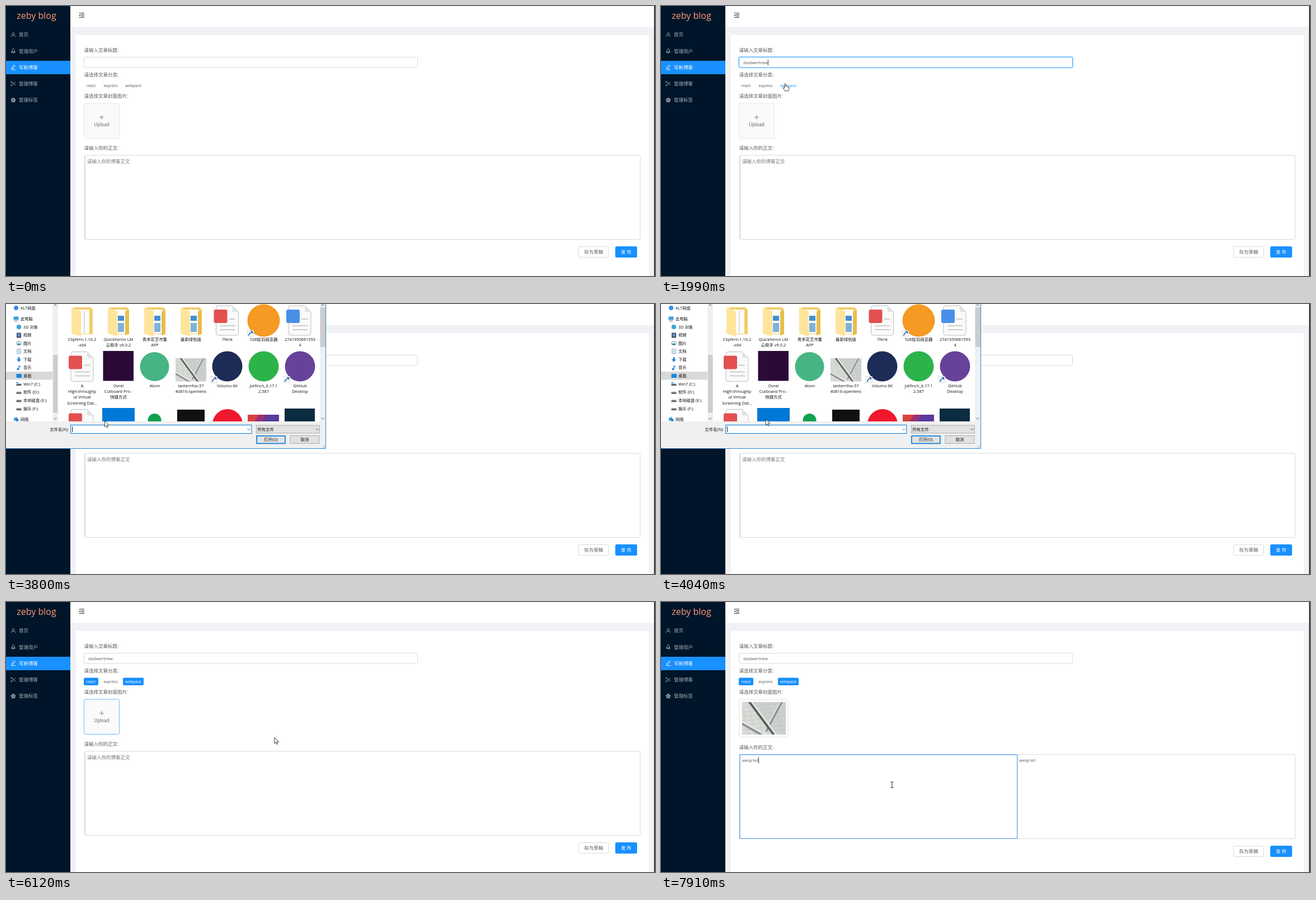
An HTML page that plays this animation: 1160 by 483 pixels, repeating every 7990 ms.

```html
<!DOCTYPE html>
<html>
<head>
<meta charset="utf-8">
<title>Blog editor</title>
<style>
  html, body { margin: 0; width: 100%; height: 100%; overflow: hidden; background: #fff; }
  svg { display: block; }
  text { font-family: 'Open Sans', 'Noto Sans CJK SC', 'Noto Sans CJK JP', sans-serif; white-space: pre; }
</style>
</head>
<body>
<svg id="stage" width="1160" height="483" viewBox="0 0 1160 483"></svg>
<script>
const LOOP = 7990;
const BLUE = '#1890ff', INK = '#595959', LINE = '#d9d9d9', WIN = '#0078d7';

// y is the middle of the line of text
const text = (x, y, str, size = 8.5, fill = INK, more = '') =>
  `<text x="${x}" y="${y + size * 0.36}" font-size="${size}" fill="${fill}" ${more}>${str}</text>`;
const rect = (x, y, w, h, fill, more = '') =>
  `<rect x="${x}" y="${y}" width="${w}" height="${h}" fill="${fill}" ${more}/>`;
const circle = (x, y, r, fill, more = '') =>
  `<circle cx="${x}" cy="${y}" r="${r}" fill="${fill}" ${more}/>`;
const path = (d, fill, more = '') => `<path d="${d}" fill="${fill}" ${more}/>`;
const line = (d, stroke, width = 1) =>
  path(d, 'none', `stroke="${stroke}" stroke-width="${width}"`);
const group = (id, body, more = '') => `<g id="${id}" ${more}>${body}</g>`;
const box = (x, y, w, h, stroke, fill = '#fff', more = '') =>
  rect(x, y, w, h, fill, `stroke="${stroke}" rx="2.5" ${more}`);
const MID = 'text-anchor="middle"';

const photo = `<symbol id="photo" viewBox="0 0 78 58" preserveAspectRatio="none">
  ${rect(0, 0, 78, 58, '#cdd0cd')}
  ${path('M0 0H14L58 58H0Z', '#d9dbd7')}
  ${[...Array(9)].map((_, i) =>
    line(`M${i * 12 - 14} 0l14 58M0 ${i * 8 + 2}l78 -9`, '#b4b8b5', 0.5)).join('')}
  ${line('M70 0L42 52', '#8b918e', 5)}${line('M68 0L40 52', '#e3e5e2', 2)}
  ${line('M13 -2L59 60', '#59605e', 6)}${line('M16 -2L62 60', '#e6e8e5', 3)}
  ${line('M0 38L38 60', '#8d9390', 5)}${line('M0 35L42 59', '#e9ebe8', 2.5)}
</symbol>`;

function sidebar() {
  const icons = [
    'M-3.5 4a3.5 3.5 0 0 1 7 0M0 .5a2 2 0 1 1 .1 0',
    'M-2 2V-1Q-2 -3 0 -4.5Q2 -3 2 -1V2ZM-2 0L-3.5 2.5H3.5L2 0M0 2.5V4.5',
    'M-3 2L-2.5 0L2 -4L3.5 -2.5L-1 1.8ZM-4 4H4',
    'M-3 -3L4 3M-3 3L4 -3M-3.4 -2a1 1 0 1 1 .1 0M-3.4 4a1 1 0 1 1 .1 0',
    'M0 -4L4 -1L2.5 3.5H-2.5L-4 -1ZM-4 -1H4L-2.5 3.5L0 -4L2.5 3.5Z'
  ];
  const names = ['首页', '管理用户', '写新博客', '管理博客', '管理标签'];
  return rect(0, 0, 115, 483, '#001529') +
    text(54.5, 17.5, 'zeby blog', 16, '#ff9b7b', MID) +
    rect(0, 98, 115, 24, BLUE) +
    names.map((name, i) => {
      const y = 51.2 + i * 29.25, on = i === 2, color = on ? '#fff' : '#a6adb4';
      return `<g transform="translate(13 ${y})">${line(icons[i], color, 0.9)}</g>` +
        text(23, y, name, 8.5, color, on ? 'font-weight="500"' : '');
    }).join('');
}

function page() {
  const tags = [['react', 139, 26], ['express', 170, 34], ['webpack', 209, 37]];
  return rect(0, 0, 1160, 483, '#f0f2f5') + rect(115, 0, 1043, 37.5, '#fff') +
    rect(125, 52, 1024, 431, '#fff') + rect(1158.5, 0, 1.5, 483, '#111') +
    line('M130.5 12.8H140M134 15.4H140M134 18H140M130.5 20.6H140', '#333') +
    path('M130.5 16.7l2.4 -1.8v3.6z', '#333') +
    text(139.5, 78.5, '请输入文章标题:') +
    box(138.5, 90.5, 598, 20, '#1890ff', 'none', 'id="glow" stroke-width="2" stroke-opacity=".25"') +
    box(139.5, 91.5, 596, 18.5, LINE, '#fff', 'id="input"') +
    text(147, 101, '', 7.85, INK, 'id="title"') +
    rect(0, 96, 0.8, 10, '#000', 'id="titleCaret"') +
    text(139.5, 123, '请选择文章分类:') +
    tags.map(([name, x, w]) =>
      rect(x, 135.5, w, 13.5, BLUE, `id="${name}Bg" rx="2"`) +
      text(x + w / 2, 142.3, name, 7, INK, `id="${name}" ${MID}`)).join('') +
    text(139.5, 161, '请选择文章封面图片:') +
    box(139.5, 174, 63, 62.5, LINE, '#fafafa', 'id="card" stroke-dasharray="2 1.2"') +
    group('uploadHint', line('M171 195V203M167 199H175', '#777', 0.9) +
      text(171, 212, 'Upload', 8.2, INK, MID)) +
    '<use id="cover" href="#photo" x="145" y="179" width="78" height="58"/>' +
    group('lower',
      text(139.5, 254, '请输入你的正文:') +
      box(140.5, 267, 993, 150.5, LINE) + line('M141.5 268V417', '#d0d0d0', 0.8) +
      rect(140.7, 267.3, 496, 149.8, 'none', 'id="ring" stroke="#6ea3f8" stroke-width="1.4" rx="1"') +
      text(145, 277.5, '请输入你的博客正文', 8.5, '#757575', 'id="placeholder"') +
      text(145, 277.5, '', 8, INK, 'id="body"') +
      text(640, 277.5, '', 8, INK, 'id="preview"') +
      rect(0, 271.5, 0.8, 11, '#000', 'id="bodyCaret"') +
      box(1023.5, 430.5, 53.5, 19, LINE) + text(1050.3, 440, '存为草稿', 8.5, INK, MID) +
      rect(1089, 430, 39, 20, BLUE, 'rx="2.5"') + text(1108.5, 440, '发 布', 8.5, '#fff', MID));
}

const folder = (x, strip) =>
  path(`M${x - 15} 6H${x + 15}L${x + 19} 10V54H${x - 12}Z`, '#f2cd68') +
  rect(x - 9, 10, 22, 43, '#fbfbf8') +
  (strip ? rect(x - 1, 21, 11, 9, '#3f8fd8') + rect(x - 1, 34, 11, 16, '#7eb2dc') +
    path(`M${x + 12} 14l7 -3v43l-7 2z`, '#e9bd4d') : line(`M${x + 4} 12v40`, '#ddd', 2)) +
  path(`M${x - 19} 6l17 7v45l-17 -5z`, '#ffe49c');

const doc = (x, y, color) =>
  path(`M${x - 20} ${y + 4}q0 -4 4 -4h25l11 11v38q0 4 -4 4h-32q-4 0 -4 -4z`, '#fafafa', 'stroke="#bdbdbd"') +
  path(`M${x + 9} ${y}v8q0 3 3 3h8z`, '#e2e2e2') +
  line(`M${x + 3} ${y + 24}h11M${x - 13} ${y + 36}h27M${x - 13} ${y + 43}h27`, '#ccc', 2) +
  rect(x - 24, y + 7, 24, 24, color, 'rx="3"');

const shortcut = (x, y) =>
  rect(x - 5.5, y - 5.5, 11, 11, '#fff', 'stroke="#bbb" stroke-width=".6"') +
  line(`M${x - 3} ${y + 4}q0 -4 4 -5`, '#1c62b5', 1.8) +
  path(`M${x - 1} ${y - 4}h5v5z`, '#1c62b5');

const chevron = (x, y, s = 1) => line(`M${x - 2.5} ${y - 1.2 * s}l2.5 ${2.4 * s}l2.5 ${-2.4 * s}`, '#444', 0.9);

function navPane() {
  const drive = [143, 157.6, 172.2, 187];
  const rows = [['KLT网盘', 7], ['此电脑', 26.5], ['3D 对象', 41], ['视频', 55.8], ['图片', 70.3],
    ['文档', 84.8], ['下载', 99.3], ['音乐', 113.8], ['桌面', 128.4], ['Win7 (C:)', 143],
    ['软件 (D:)', 157.6], ['本地磁盘 (E:)', 172.2], ['娱乐 (F:)', 187], ['网络', 206]];
  const top = [0, 1, 13];
  return rect(0, 121, 83, 14.5, LINE) +
    rows.map(([name, y], i) => text(top.includes(i) ? 26 : 31, y, name, 7.3, '#111')).join('') +
    circle(18, 7, 4, '#3c8be8') +
    rect(13.5, 22.5, 9, 6, '#3b9fe0') + line('M15 30.5h6', '#667') +
    path('M23 36.5l4 2v5l-4 2l-4 -2v-5z', '#3aa7dc') +
    rect(19, 51.5, 8, 9, '#44546a') + rect(21, 53, 4, 5, '#6f8fe0') +
    box(19, 67, 8, 6.5, '#6d9fc5', '#d8eefb') + path('M19.5 73l3 -3l2 1l2 2z', '#3a8a5c') +
    rect(19.8, 80.5, 6.5, 8.5, '#fff', 'stroke="#7b93a8" stroke-width=".8"') +
    line('M21 83h4M21 85h4M21 87h4', '#4b8fd0', 0.7) +
    path('M21.5 95h3v4h2.5l-4 5l-4 -5h2.5z', '#2b83d8') +
    line('M23 110v6M23 110q1 2 3 3', '#2b83d8', 1.3) + circle(21.5, 116.5, 2, '#2b83d8') +
    rect(18.5, 125, 9.5, 7, '#1787e0') +
    drive.map((y) => rect(18.5, y, 9, 3.2, '#5d6670') + line(`M19.5 ${y - 0.8}h7`, '#c2c8cc', 1.2)).join('') +
    rect(18.5, 139.5, 3, 2.5, '#25a5e8') +
    path('M14 204l6 -2v6l-6 1z', '#3b9fe0') + circle(20, 207.5, 2.5, '#2d78c4') +
    rect(83.5, 0, 9.5, 210, '#f0f0f0') + rect(84, 91, 8.5, 103.5, '#cdcdcd') +
    chevron(88, 2, -1) + chevron(88, 205);
}

function files() {
  const cols = [136, 201, 266, 330.5, 395.5, 460.5, 525.5];
  const names = [
    ['Clipfern-1.16.2|-x64', 'Quickheron LM|云助手 v9.0.2', '青禾花艺市集|APP', '最新绿色版', '7fenk',
      '528轻羽阅览器', '2741950681593|4'],
    ['A|High-throughp|ut Virtual|Screening Dat...', 'Ovrel|Cutboard Pro -|快捷方式', 'Atom',
      'lanternfox-57|40816-openlens', 'Volumo 6K', 'Jotfinch_6.17.1|2.587', 'GitHub|Desktop']
  ];
  const labels = names.map((row, r) => row.map((name, c) => name.split('|').map((part, i) =>
    text(cols[c], 63.5 + r * 82.5 + i * 10.3, part, 7.4, '#111', MID)).join('')).join('')).join('');
  return rect(299.5, 82, 63, 81, '#cce8ff', 'id="picked" stroke="#99d1ff"') +
    folder(136) + folder(201, 1) + folder(266, 1) + folder(331, 1) +
    doc(395.5, 3, '#e2504f') + circle(460.5, 29.5, 29, '#f59a23') + doc(525, 3, '#4a8fe7') +
    doc(136, 85.5, '#e2504f') + rect(173.5, 84, 54.5, 53.5, '#2b0a38') +
    circle(265.5, 112, 26, '#46b583') +
    '<use href="#photo" x="303" y="97" width="55" height="41.5"/>' +
    circle(395.5, 111.5, 27, '#1d2b57') + circle(460.5, 111.5, 27, '#2cb34a') + circle(525.5, 111.5, 27, '#66429a') +
    doc(136, 188.5, '#e2504f') + rect(172, 186, 58, 30, WIN) + circle(265.5, 208, 12, '#12a150') +
    rect(306, 189, 49, 30, '#111') + circle(396, 215, 27, '#f0182d') +
    rect(432, 198, 56, 20, '#9c2f74') + path('M432 198h20l-8 12h-12z', '#d8423f') + path('M466 198h22v12h-30z', '#5a3a9c') +
    rect(498, 187, 54, 30, '#0b2b40') +
    shortcut(437, 52.5) + shortcut(372, 135) + shortcut(502, 135) +
    group('lateMarks', shortcut(177, 135) + shortcut(242, 135)) + labels;
}

function dialog() {
  return rect(0, 0, 572, 259, '#f0f0f0') +
    `<g clip-path="url(#pane)">${rect(0, 0, 572, 210, '#fff')}${navPane()}${files()}` +
    rect(561, 0, 10.5, 210, '#f0f0f0') + rect(561.5, 6, 9.5, 71, '#cdcdcd') +
    chevron(566, 2, -1) + chevron(566, 205) + '</g>' +
    text(112, 224, '文件名(N):', 7.3, '#111', 'text-anchor="end"') +
    rect(115.5, 216.5, 323.5, 15, '#fff', `stroke="${WIN}"`) + chevron(434, 224.3) +
    text(117.5, 224, 'lanternfox-5740816-openlens', 7.4, '#111', 'id="fileName"') +
    rect(118, 219, 0.9, 10, '#000', 'id="fileCaret"') +
    rect(447.5, 217, 113, 14, '#e1e1e1', 'stroke="#adadad"') + text(449.5, 224, '所有文件', 7.3, '#111') + chevron(556, 224.3) +
    rect(448, 236, 51, 13.5, '#e1e1e1', `stroke="${WIN}" stroke-width="1.6"`) + text(473.5, 242.6, '打开(O)', 7.3, '#111', MID) +
    rect(508, 235.5, 52, 14, '#e1e1e1', 'stroke="#adadad"') + text(534, 242.6, '取消', 7.3, '#111', MID) +
    line('M565 257.5l5 -5M567.5 257.5l2.5 -2.5', '#aaa', 1) +
    line('M0 258.5H571.5V0', '#2b84cf', 1);
}

const pointers =
  path('M0 0V11L2.5 8.7L4.1 12.4L5.8 11.6L4.2 8H7.4Z', '#fff', 'id="arrow" stroke="#111" stroke-width=".8"') +
  path('M-1.2 .8Q0 -.8 1.2 .8V5Q2.4 4.2 3.2 5.4Q4.4 4.7 5.2 6Q6.9 5.6 7 7.4Q7 10.5 5.5 13H-.5Q-1.5 10.5 -4 8Q-4 6 -1.2 7.6Z',
    '#fff', 'id="hand" stroke="#111" stroke-width=".8"') +
  group('beam', line('M-2.5 -5H2.5M0 -5V5M-2.5 5H2.5', '#222', 1));

const stage = document.getElementById('stage');
stage.innerHTML = `<defs>${photo}<clipPath id="pane"><rect width="572" height="210"/></clipPath></defs>` +
  page() + sidebar() + group('dialog', dialog()) + group('pointer', pointers);

const $ = (id) => document.getElementById(id);
const show = (id, on) => $(id).setAttribute('visibility', on ? 'inherit' : 'hidden');
const set = (id, attrs) => Object.entries(attrs).forEach(([k, v]) => $(id).setAttribute(k, v));
const between = (t, a, b) => t >= a && t < b;
const ramp = (t, a, b) => Math.min(1, Math.max(0, (t - a) / (b - a)));

// pointer runs: [time, x, y]; it hides while keys are pressed
const runs = [
  [920, [[70, 951, 441], [250, 830, 370], [700, 375, 112], [780, 352, 102]]],
  [7280, [[1690, 352, 102], [1990, 222, 139], [2300, 222, 139], [2690, 152, 142], [2920, 152, 142],
    [3300, 174, 200], [3470, 172, 210], [3700, 172, 210], [4040, 187, 206], [4410, 345, 150],
    [4490, 359, 132], [4650, 354, 125], [5300, 354, 125], [5650, 478, 250], [5800, 480, 242],
    [6120, 480, 242], [6590, 413, 304], [6680, 413, 306]]],
  [LOOP, [[7760, 413, 310], [7910, 413, 327]]]
];

function pointerAt(t) {
  const run = runs.find(([end, pts]) => between(t, pts[0][0], end));
  if (!run) return null;
  const pts = run[1], i = pts.findIndex((p) => p[0] > t);
  if (i < 0) return pts[pts.length - 1].slice(1);
  const [a, b] = [pts[i - 1], pts[i]], k = ramp(t, a[0], b[0]);
  return [a[1] + (b[1] - a[1]) * k, a[2] + (b[2] - a[2]) * k];
}

const typed = (word, times, t) => word.slice(0, times.filter((s) => t >= s).length);
const titleKeys = [1000, 1150, 1300, 1610, 1610, 1690, 1690, 1760, 1760, 1840];
const bodyKeys = [7280, 7360, 7360, 7440, 7510, 7590, 7760];

function typeInto(id, caret, word, x, on) {
  $(id).textContent = word;
  show(caret, on);
  $(caret).setAttribute('x', x + (word ? $(id).getComputedTextLength() : 0));
}

function render(t) {
  const open = between(t, 3630, 5880), loaded = t >= 6680, grown = t >= 6590;
  const p = pointerAt(t), [px, py] = p || [-99, -99];
  const over = (x, y, w, h) => !open && between(px, x, x + w) && between(py, y, y + h);
  const overInput = over(139, 91, 597, 19), overTags = over(139, 135, 108, 14);
  const overBody = over(140, loaded ? 273 : 267, 994, 150);

  const focus = between(t, 840, 2150);
  set('input', { stroke: focus || overInput ? '#40a9ff' : LINE });
  set('glow', { opacity: ramp(t, 840, 1000) * (1 - ramp(t, 2150, 2300)) });
  typeInto('title', 'titleCaret', typed('dadwertrew', titleKeys, t), 147, focus);

  const tag = (name, x, w, from) => {
    const on = t >= from;
    show(name + 'Bg', on);
    set(name, { fill: on ? '#fff' : over(x, 135, w, 14) ? BLUE : INK });
  };
  tag('react', 139, 26, 2770);
  tag('express', 170, 34, Infinity);
  tag('webpack', 209, 37, 2230);

  const hot = over(139, 174, 64, 63) || between(t, 3630, 6590);
  set('card', { stroke: hot ? BLUE : LINE, width: grown ? 88 : 63, height: loaded ? 68 : 62.5 });
  show('uploadHint', !grown);
  show('cover', loaded);

  const word = typed('weqrtet', bodyKeys, t);
  set('lower', { transform: `translate(0 ${loaded ? 6 : 0})` });
  show('ring', t >= 6910);
  show('placeholder', !word);
  typeInto('body', 'bodyCaret', word, 145, t >= 6910);
  $('preview').textContent = word;

  show('dialog', open);
  set('dialog', { opacity: ramp(t, 3560, 3780) });
  set('picked', { opacity: t >= 4570 ? 1 : t >= 4410 ? 0.5 : 0 });
  show('fileName', open && t >= 4570);
  show('fileCaret', open && t < 4570);
  show('lateMarks', open && t >= 4110);

  show('pointer', p);
  set('pointer', { transform: `translate(${px} ${py})` });
  const shape = overTags ? 'hand' : overInput || overBody ? 'beam' : 'arrow';
  ['arrow', 'hand', 'beam'].forEach((id) => show(id, p && id === shape));
}

const start = performance.now();
function tick() {
  render((performance.now() - start) % LOOP);
  requestAnimationFrame(tick);
}
tick();
</script>
</body>
</html>
```
